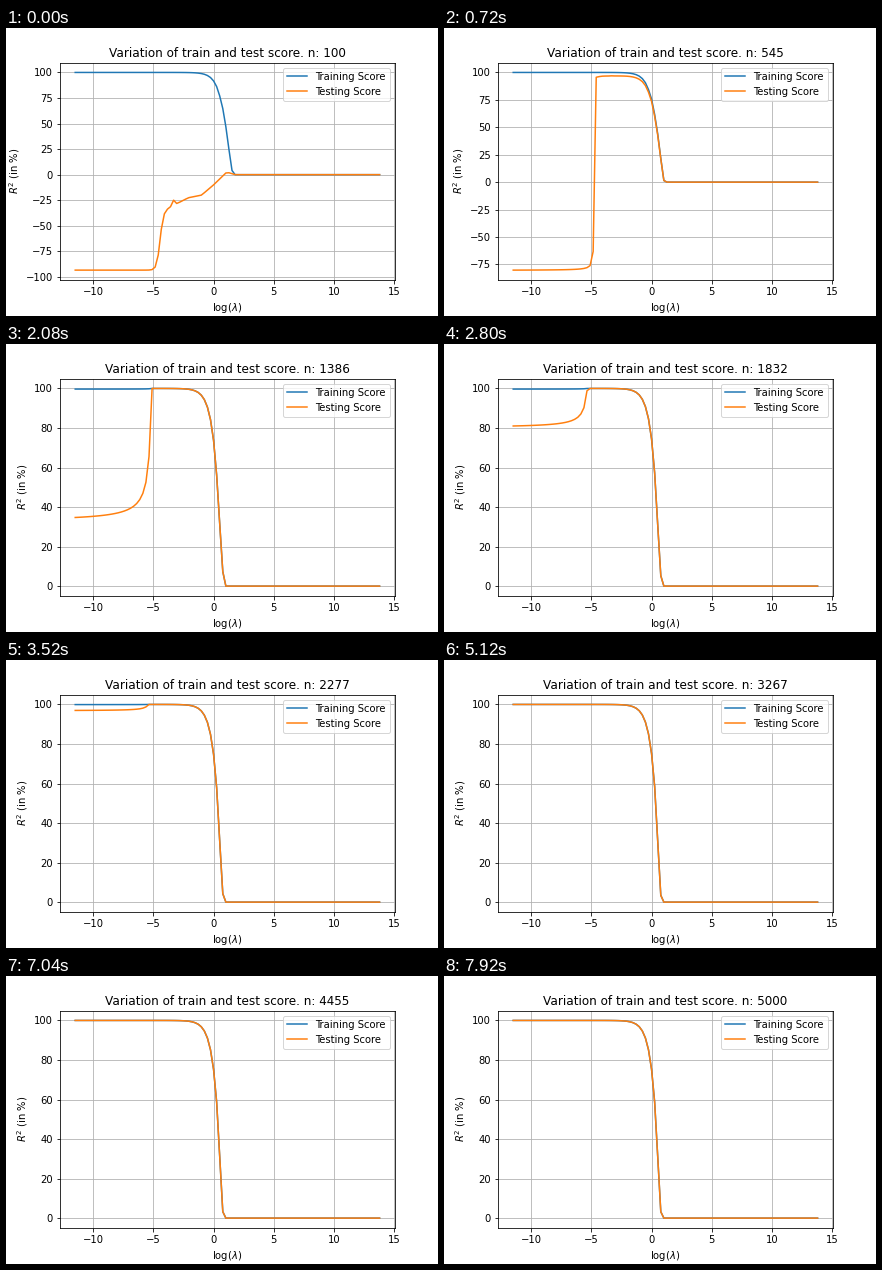
Write a matplotlib script that moves like this. It is 432 px wide and 288 px high and loops after 8000 ms.

```python
import numpy as np
import matplotlib.pyplot as plt
from matplotlib.animation import FuncAnimation

FRAMES = 100
INTERVAL = 80
FIRST, LAST = 100, 5000
WORST = -93.4

plt.rcParams.update({
    "figure.dpi": 72,
    "font.family": "DejaVu Sans",
    "font.size": 10,
    "figure.subplot.bottom": 0.125,
})

sizes = np.linspace(FIRST, LAST, FRAMES).astype(int)
lam = np.logspace(-5, 6, 100)
x = np.log(lam)


def decay(n, scale, power=1):
    return np.exp(-((n - FIRST) / scale) ** power)


def thresholded_fit(n):
    """Score left after soft-thresholding five evenly spread weights."""
    slow = decay(n, 720)
    mean = 2 - 0.5 * slow + 1.78 * decay(n, 150)
    spread = 0.15 + 0.66 * slow
    w = mean + spread * np.arange(-2, 3)
    lost = np.minimum(w[:, None], lam) ** 2
    return 100 * (1 - lost.sum(axis=0) / (w ** 2).sum())


def recovery(gain):
    """Hyperbolic climb from 0 at the smallest penalty to 1 at the edge."""
    edge = -4.75 - 0.35 * gain
    gap = np.maximum(edge - x, 1e-6)
    return np.minimum(0.35 * gain ** 1.4 * (1 / gap - 1 / gap[0]), 1)


def few_sample_test():
    """Test score when there are too few samples to find the signal."""
    climb = np.interp(x, [-4, -2.1, -1, 0, 1.1, 1.8],
                      [-34, -22.6, -20, -10, 2.5, 0])
    bump = 5 * np.exp(-((x + 3.33) / 0.15) ** 2)
    wall = 0.5 - 0.5 * np.tanh((x + 4.45) / 0.28)
    return climb + bump + (WORST + 34) * wall


def scores(n):
    gain = 1 - decay(n, 1245, 2.55)
    rise = recovery(gain)
    train = thresholded_fit(n) - 5 * gain ** 4 * (1 - gain) * (1 - rise)
    base = WORST + (100 - WORST) * gain
    test = base + (train - base) * rise
    mix = decay(n, 120)
    return train, mix * few_sample_test() + (1 - mix) * test


fig, ax = plt.subplots(figsize=(6, 4))


def draw(frame):
    n = sizes[frame]
    train, test = scores(n)
    ax.clear()
    ax.plot(x, train, label="Training Score")
    ax.plot(x, test, label="Testing Score")
    ax.set_title(f"Variation of train and test score. n: {n}")
    ax.set_xlabel(r"$\log(\lambda)$")
    ax.set_ylabel(r"$R^2$ (in %)")
    ax.legend(loc="upper right")
    ax.grid(True)


anim = FuncAnimation(fig, draw, frames=FRAMES, init_func=lambda: None,
                     interval=INTERVAL, repeat=True, repeat_delay=0)
plt.show()
```
